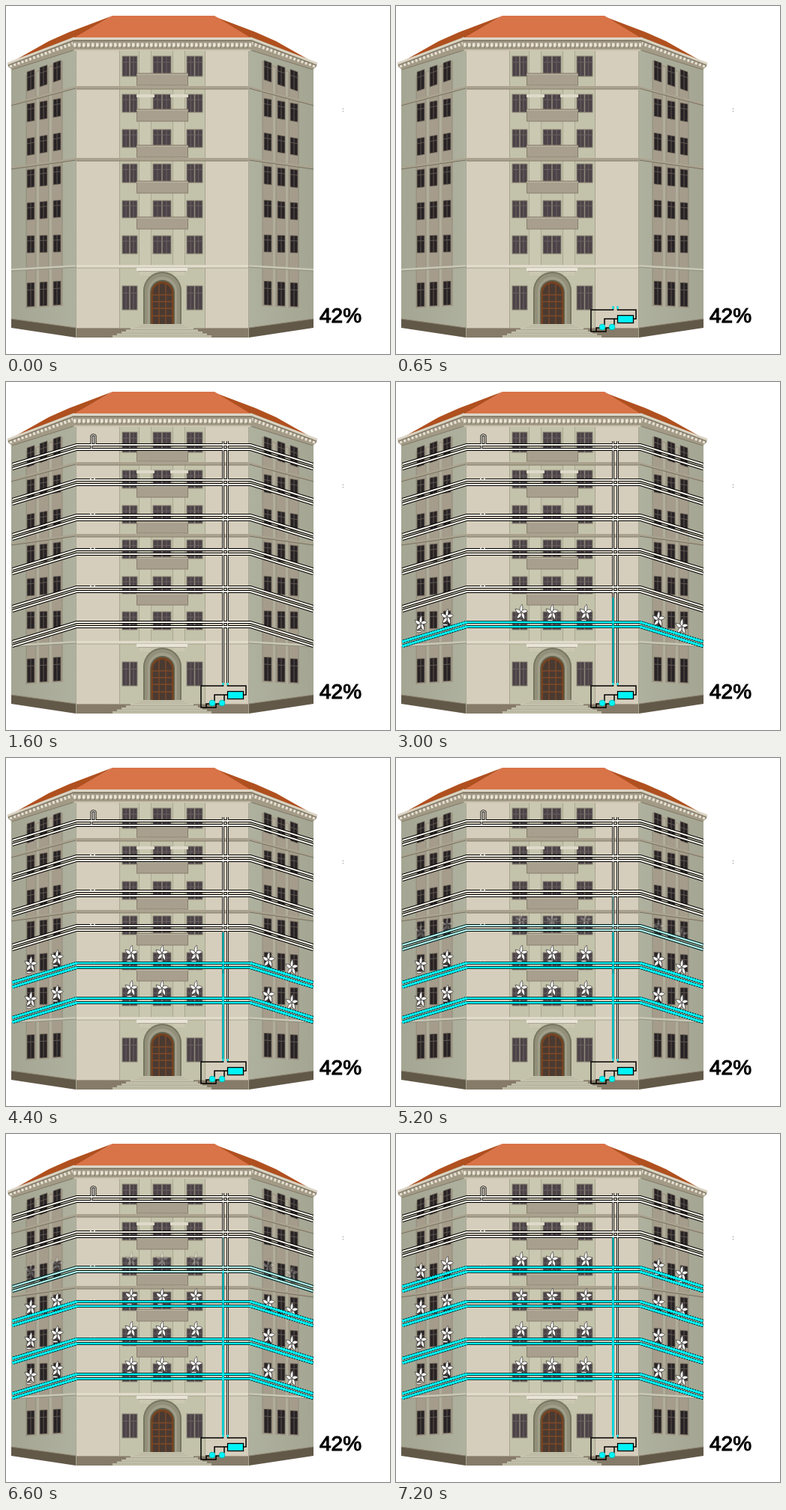
Animation, 512 px wide and 465 px high, one loop 8000 ms. Source, as an HTML page:

```html
<!DOCTYPE html>
<html lang="en">
<head>
<meta charset="utf-8">
<title>Building water circuit</title>
<style>
  html, body { margin: 0; width: 100%; height: 100%; overflow: hidden; background: #fff; }
  svg { display: block; width: 512px; height: 465px; }
  .fade { opacity: 0; animation: 8s step-end infinite; }
  #pump { animation-name: pump; }
  #pipes { animation-name: pipes; }
  #water0 { animation-name: water0; }
  #water1 { animation-name: water1; }
  #water2 { animation-name: water2; }
  #water3 { animation-name: water3; }
  @keyframes pump { 0% { opacity: 0 } 6.25% { opacity: .25 } 6.875% { opacity: .5 } 7.5% { opacity: .75 } 8.125%, 100% { opacity: 1 } }
  @keyframes pipes { 0% { opacity: 0 } 18.125% { opacity: .25 } 18.75% { opacity: .5 } 19.375% { opacity: .75 } 20%, 100% { opacity: 1 } }
  @keyframes water0 { 0% { opacity: 0 } 30% { opacity: .25 } 32.5% { opacity: .5 } 35% { opacity: .75 } 37.5%, 100% { opacity: 1 } }
  @keyframes water1 { 0% { opacity: 0 } 47.5% { opacity: .25 } 50% { opacity: .5 } 52.5% { opacity: .75 } 55%, 100% { opacity: 1 } }
  @keyframes water2 { 0% { opacity: 0 } 65% { opacity: .25 } 67.5% { opacity: .5 } 70% { opacity: .75 } 72.5%, 100% { opacity: 1 } }
  @keyframes water3 { 0% { opacity: 0 } 82.5% { opacity: .25 } 85% { opacity: .5 } 87.5% { opacity: .75 } 90%, 100% { opacity: 1 } }
</style>
</head>
<body>
<svg id="stage" viewBox="0 0 512 465" xmlns="http://www.w3.org/2000/svg">
  <defs>
    <linearGradient id="sideWall"><stop stop-color="#a4a693"/><stop offset="1" stop-color="#afb19f"/></linearGradient>
    <g id="fan" stroke="#3f3c39" stroke-width=".8" fill="#fff">
      <path d="M-1 2L-3 10" stroke-width="1.600"/>
      <ellipse cx="-2.500" cy="10.500" rx="3.500" ry="1.300"/>
      <g id="blades" transform="scale(.8 1)"></g>
      <circle r="1.200" fill="#bbb"/>
    </g>
  </defs>
  <g id="side"></g>
  <use href="#side" transform="matrix(-1 0 0 1 417 0)"/>
  <g id="front"></g>
  <g id="pump" class="fade"></g>
  <g id="pipes" class="fade"></g>
  <g id="water0" class="fade"></g>
  <g id="water1" class="fade"></g>
  <g id="water2" class="fade"></g>
  <g id="water3" class="fade"></g>
  <text x="418" y="423" font-family="Arial, 'Liberation Sans', sans-serif" font-size="28" stroke="#000" stroke-width="1.100">42%</text>
  <path d="M448.500 137.500h2M448.500 140.500h2" stroke="#999" stroke-width=".8"/>
</svg>
<script>
const put = (id, ...parts) => document.getElementById(id).innerHTML = parts.flat().join('');
const rect = (x, y, w, h, fill, more = '') => `<rect x="${x}" y="${y}" width="${w}" height="${h}" fill="${fill}" ${more}/>`;
const shape = (d, fill, more = '') => `<path d="${d}" fill="${fill}" ${more}/>`;
const line = (d, color, w = 1, more = '') => `<path d="${d}" fill="none" stroke="${color}" stroke-width="${w}" ${more}/>`;

// side wall, mirrored for the right
const sideRows = [[88, 76, 26], [131, 125, 24], [177, 171, 23], [219, 215, 24], [263, 260, 23], [307, 306, 23], [370, 368, 32]];
const sideWindow = (x, [a, b, h]) => {
  const k = (b - a) / 35, y = a + k * (x - 28);
  return shape(`M${x} ${y}l10 ${k * 10}v${h}l-10 ${-k * 10}z`, '#272224', 'stroke="#7f7869" stroke-width=".8"') +
    line(`M${x + 5} ${y + k * 5}v${h}M${x} ${y + h * .3}l10 ${k * 10}`, '#655d56', .9);
};
const sideBelt = (y0, y1, h, top, low) =>
  shape(`M7 ${y0}L93 ${y1}v${h}L7 ${y0 + h}z`, top) + line(`M7 ${y0 + h}L93 ${y1 + h}`, low);

put('side',
  shape('M142 13L91 43L4 77L57 47L84 35z', '#b0501f'),
  shape('M7 80L93 54V433L7 421z', 'url(#sideWall)'),
  shape('M27 92L75 73V401L27 404z', '#a59c8b'),
  line('M27 92V404M75 73V401', '#908b7b'),
  line('M42 88V403M59 82V402', '#b0ad9b', 4),
  line('M40 88V403M57 82V402', '#8f887a', .8),
  sideRows.map(r => [28, 45, 63].map(x => sideWindow(x, r)).join('')),
  sideBelt(130, 107, 3, '#aaa38f', '#777160'),
  sideBelt(215, 203, 3, '#aaa38f', '#777160'),
  sideBelt(351, 346, 3, '#c9c8b6', '#8f8d7c'),
  shape('M7 418L93 430V443L7 430z', '#625848'),
  line('M7 418L93 430', '#8d8370'),
  shape('M2 76L91 41V59L8 85L3 81z', '#a39a86'),
  line('M5 80.500L91 49.500', '#e6e1d3', 4, 'stroke-dasharray="3 2.500"'),
  line('M2 77L91 43', '#dcd5c4', 2.500),
  line('M3 79.500L91 46', '#766e5f'),
  line('M8 85L91 59', '#7f7867')
);

// front wall
const rows = [[67, 27], [118, 24], [165, 24], [211, 25], [260, 23], [307, 24], [374, 32]];
const frontWindow = (x, w, [y, h]) =>
  rect(x, y, w, h, '#4b4347', 'stroke="#8d8678"') +
  line(`M${x + w / 2} ${y}v${h}`, '#8d8678', 1.600) +
  line(`M${x + w / 4} ${y}v${h}m${w / 2} 0v${-h}M${x} ${y + h * .3}h${w}`, '#6e6562', .9);
const belt = (y, top, low) => rect(93, y, 231, 4, top) + line(`M93 ${y + 4}h231`, low);
const balcony = y =>
  rect(174.500, y, 68, 16, '#a89f8e', 'stroke="#877e6e"') + line(`M174 ${y + 1.500}h69`, '#bdb5a3');
const arch = (x, top, fill) => {
  const r = 208.500 - x;
  return shape(`M${x} 425V${top + r}A${r} ${r} 0 0 1 ${x + 2 * r} ${top + r}V425z`, fill);
};
const steps = [0, 1, 2, 3, 4, 5, 6].map(i => rect(142 + i * 6, 440.400 - i * 2.600, 132 - i * 12, 2.600, '#b7b59e') +
  line(`M${142 + i * 6} ${440.900 - i * 2.600}h${132 - i * 12}`, '#d0cebb'));

put('front',
  shape('M142 13H278L327 43H90z', '#d97348'),
  rect(93, 58, 231, 374, '#d6cebc'),
  rect(151, 60, 115, 370, '#c3c2aa'),
  rect(178, 60, 15, 300, '#cac8b1'), rect(223, 60, 15, 300, '#cac8b1'),
  line('M151.500 60V430M265.500 60V430', '#a8a48f'),
  line('M177.500 60V350M193.500 60V350M222.500 60V350M238.500 60V350', '#aaa791'),
  belt(107, '#aaa18e', '#847c6a'),
  belt(203, '#aaa18e', '#847c6a'),
  belt(346, '#e0dbca', '#aaa490'),
  rows.map((r, i) => frontWindow(155, 20, r) + (i < 6 ? frontWindow(196, 24, r) : '') + frontWindow(241, 21, r)),
  rect(174, 118, 24, 4, '#dedac9'), rect(219, 118, 24, 4, '#dedac9'),
  [90, 138, 186, 234, 282].map(balcony),
  rect(93, 430, 231, 13, '#857b68'), line('M93 430.500H324', '#a39a87'),
  line('M93.500 58V443M323.500 58V443', '#aaa693'),
  steps,
  rect(174, 350, 68, 4, '#e8e4d7'), line('M176 354.500h64', '#aaa692'),
  arch(183, 355, '#77765f'), arch(185, 357, '#92907a'), arch(189, 362, '#a19f89'), arch(192, 366, '#656350'),
  arch(193.500, 368, '#74421f'), arch(196, 371, '#4a3a31'),
  line('M204 370V425M213 370V425M195 386H222M195 395H222M195 404H222M195 414H222', '#7f4a28', 1.300),
  rect(89, 42, 239, 18, '#a39a86'),
  line('M90 52H327', '#eae5d8', 5, 'stroke-dasharray="3.500 2.500"'),
  line('M90 55H327', '#777061', 1, 'stroke-dasharray="2 4" stroke-dashoffset="-3"'),
  line('M89 43.500H328', '#dcd5c4', 3), line('M89 46.500H328', '#766e5f'), line('M91 59H326', '#cbc3b0', 2)
);

// pipework
const cyan = '#00f4f8', white = '#f8f5ec';
const levels = [324, 277, 227, 181, 134, 87];
const run = y => [-3, 3].map(o => `M8.500 ${y + o + 26}L94 ${y + o}H326L409.500 ${y + o + 26}`).join('');
const slopes = y => [-3, 3].map(o =>
  `M8.500 ${y + o + 26}L94 ${y + o}M326 ${y + o}L409.500 ${y + o + 26}`).join('');
const runs = levels.map(run).join('');
const risers = 'M289.500 79V402M295.500 79V402';
const hairpin = 'M114 89V72a3 3 0 0 1 5 0V83';

put('pump',
  line('M289.500 401V406H260V435H280V430H285M295.500 401V406H320V418H317M295 418H278V426M291 426V418M267 435V430H272', '#000', 1.500),
  line('M289.500 401V405M295.500 401V405', cyan, 2),
  rect(295.500, 413.500, 21, 10, cyan, 'stroke="#000" stroke-width="1.300"'),
  [275, 288].map(x => `<circle cx="${x}" cy="429" r="4" fill="${cyan}" stroke="#087" stroke-width=".5"/>`)
);
put('pipes',
  line(runs, '#000', 4), line(risers + hairpin, '#000', 3),
  line(runs, white, 2), line(risers + hairpin, white, 1.200),
  levels.slice(1, 5).map(y => line(`M112 ${y - 5}h2m3 0h2`, white, 1.500))
);

const blade = 'M0 0C-4 -2 -4 -7 0 -11C1 -8 3 -4 0 0z';
put('blades', [8, 80, 152, 224, 296].map(a => `<path d="${blade}" transform="rotate(${a})"/>`));

const spots = [[167, 0], [208, 0], [253, 0], [33, 15], [68, 6], [350, 9], [381, 19]];
const fanTops = [308, 261, 217, 168], riserTops = [288, 233, 183, 138];
levels.slice(0, 4).forEach((y, i) => put('water' + i,
  spots.map(([x, dy]) => `<use href="#fan" x="${x}" y="${fanTops[i] + dy}"/>`),
  line(run(y), '#000', 4),
  line(slopes(y), cyan, 4, 'stroke-dasharray="2 1.500"'),
  line(run(y), cyan, 2.400),
  line(`M289.500 ${riserTops[i]}V402`, cyan, 1.600)
));
</script>
</body>
</html>
```
